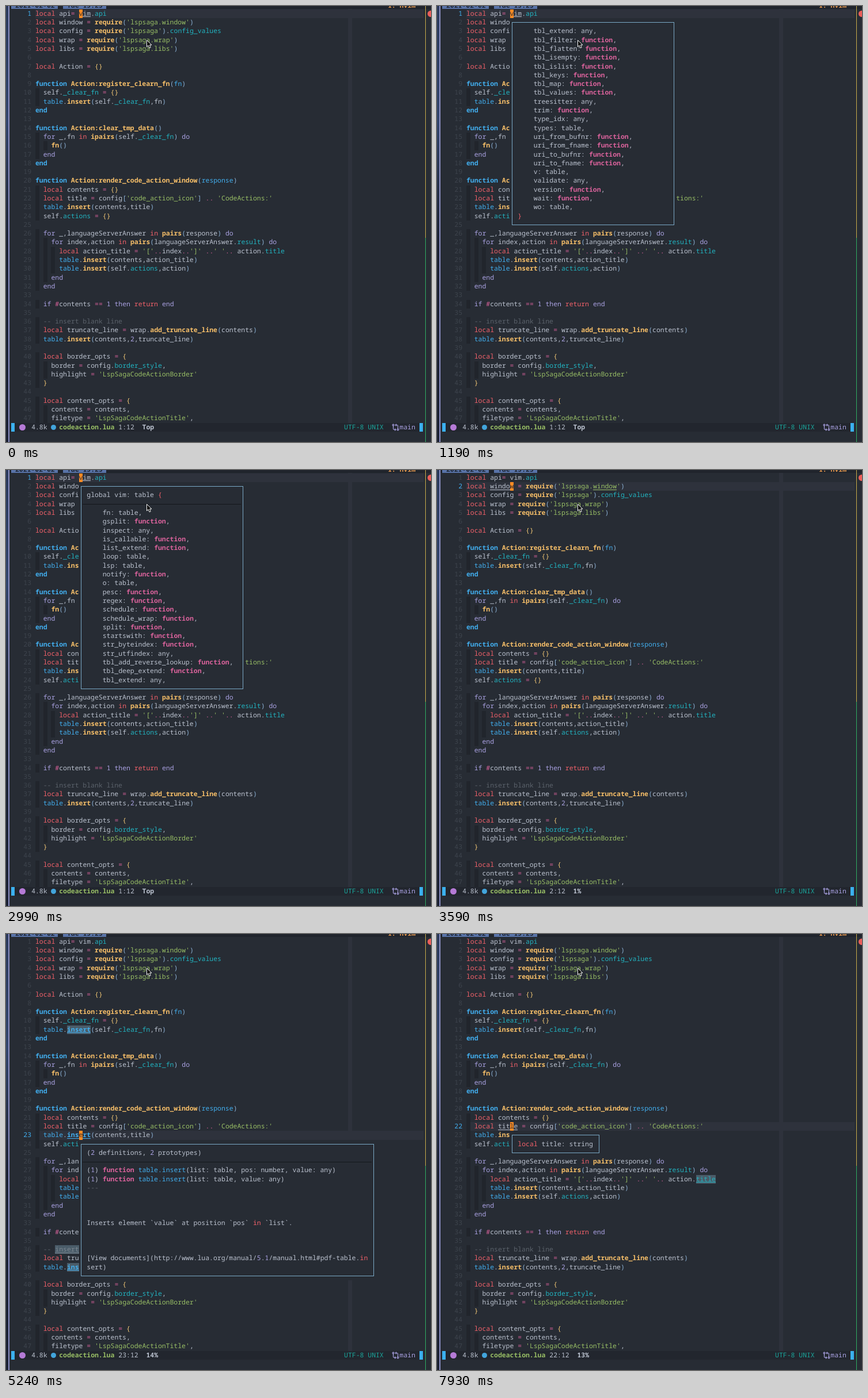
Write an HTML page that moves like this. It is 738 px wide and 758 px high and loops after 8 s.

```html
<!DOCTYPE html>
<html lang="en">
<head>
<meta charset="utf-8">
<title>Editor hover documentation</title>
<style>
:root { --bg: #272c34; --line: #2e323c; --fg: #bbc2cf; --blue: #42aeee; --w: 6.873px; --h: 15.293px; }
html, body { margin: 0; width: 738px; height: 758px; overflow: hidden; background: var(--bg); }
#stage { position: relative; width: 738px; height: 758px; overflow: hidden; color: var(--fg);
  font: 11.455px/var(--h) "Noto Sans Mono", monospace; text-rendering: geometricPrecision;
  font-variant-ligatures: none; }
#stage div, #stage svg { position: absolute; white-space: pre; }
#code, #marks, #pops, #status { left: 0; top: 0; }
.row { left: 0; height: var(--h); }
.row > div { top: 0; }
.c { color: #5b626b; }
.s { color: #98be65; }
.d { color: var(--blue); font-weight: bold; }
.f { color: #f7bf69; font-weight: bold; }
.k { color: #f2616a; }
.p { color: #a9a1e1; }
.t { color: #22b3c0; }
.b { color: var(--blue); }
.o { color: #d9629b; }
.y { color: #f0c674; }
.r { color: #8bb0d4; }
.m { color: #d9629b; font-weight: bold; }
.num { color: #3e444d; text-align: right; left: 16px; width: 28.1px; }
.num.on { color: var(--blue); }
.guide { width: var(--w); height: 15.5px; background: #21252c; }
#band { left: 51px; width: 674px; height: var(--h); background: var(--line); }
.hl { height: var(--h); background: #4a5c69; }
.hl.here { background: var(--line); }
.hl.f { color: var(--blue); }
.hl.c { color: #7d8791; }
.hl::after { content: ""; position: absolute; left: 0; right: 0; top: 12.6px; height: 1px; background: currentColor; }
#caret { width: 6.9px; height: var(--h); background: #fb8b24; color: #33302e; }
.pop { background: var(--bg); overflow: hidden; }
.frame { border: 1px solid #7aa9c6; box-sizing: border-box; }
.view { overflow: hidden; }
.rule { left: 0; height: 1px; background: #14171b; }
.bar { background: #3bb0ee; width: 5.5px; top: 725px; height: 15px; }
.tab { top: 0; height: 5px; background: #5873a8; }
.cap { top: -8px; color: #1c2431; font-weight: bold; }
</style>
</head>
<body>
<div id="stage">
  <div style="left:594px;top:5px;width:7px;height:720px;background:#2e323c"></div>
  <div id="band"></div>
  <div id="code"></div>
  <div id="marks"></div>
  <div id="caret"></div>
  <div id="pops"></div>
  <div style="left:9px;top:725px;width:716px;height:15px;background:#22262e"></div>
  <div class="bar" style="left:9px"></div>
  <div class="bar" style="left:718px"></div>
  <div style="left:23px;top:727px;width:11px;height:11px;border-radius:50%;background:#b57ad6"></div>
  <div style="left:78px;top:728px;width:9px;height:9px;border-radius:50%;background:#42a5dc"></div>
  <div id="status"></div>
  <svg style="left:670px;top:726px" width="13" height="13" fill="none" stroke="#a9a1e1" stroke-width="1.2">
    <circle cx="2.5" cy="2.5" r="1.4"/><circle cx="10.5" cy="10.5" r="1.4"/>
    <path d="M2.5 4V9Q2.5 10.5 4 10.5H6.5M5 8.7L6.8 10.5L5 12.3M10.5 9V4Q10.5 2.5 9 2.5H6.5M8 .7L6.2 2.5L8 4.3"/>
  </svg>
  <div style="left:0;top:0;width:738px;height:5px;background:#20242c"></div>
  <div class="tab" style="left:9px;width:81px"></div>
  <div class="tab" style="left:99px;width:75px"></div>
  <div style="left:0;top:0;width:738px;height:6px;overflow:hidden">
    <div class="cap" style="left:16px">2021-02-02</div>
    <div class="cap" style="left:106px">Tue 15:25</div>
    <div class="cap" style="left:663px;color:#e0954d">1: nvim</div>
  </div>
  <div style="left:0;top:0;width:4px;height:758px;background:linear-gradient(#2b3a5c,#33466e 200px,#263049 320px,#1c2233 420px)"></div>
  <div style="left:4px;top:0;width:2px;height:758px;background:#8d90c4"></div>
  <div style="left:728px;top:0;width:1.3px;height:758px;background:linear-gradient(#c9ad4b 403px,#2fae62 403px)"></div>
  <div style="left:732px;top:8px;width:11px;height:11px;border-radius:50%;background:#ec5f5b"></div>
  <svg style="left:243px;top:58px" width="14" height="18">
    <path d="M1.5 1.5V13L4.2 10.5L6 15L8.2 14L6.4 9.8H10Z" fill="#000" stroke="#fff"/>
  </svg>
</div>
<script>
const X0 = 51, Y0 = 5.85, W = 6.873, H = 15.293, LOOP = 8000, COL = 11, TOTAL = 164;

const CODE = `local api= vim.api
local window = require('lspsaga.window')
local config = require('lspsaga').config_values
local wrap = require('lspsaga.wrap')
local libs = require('lspsaga.libs')

local Action = {}

function Action:register_clearn_fn(fn)
  self._clear_fn = {}
  table.insert(self._clear_fn,fn)
end

function Action:clear_tmp_data()
  for _,fn in ipairs(self._clear_fn) do
    fn()
  end
end

function Action:render_code_action_window(response)
  local contents = {}
  local title = config['code_action_icon'] .. 'CodeActions:'
  table.insert(contents,title)
  self.actions = {}

  for _,languageServerAnswer in pairs(response) do
    for index,action in pairs(languageServerAnswer.result) do
      local action_title = '['..index..']' ..' '.. action.title
      table.insert(contents,action_title)
      table.insert(self.actions,action)
    end
  end

  if #contents == 1 then return end

  -- insert blank line
  local truncate_line = wrap.add_truncate_line(contents)
  table.insert(contents,2,truncate_line)

  local border_opts = {
    border = config.border_style,
    highlight = 'LspSagaCodeActionBorder'
  }

  local content_opts = {
    contents = contents,
    filetype = 'LspSagaCodeActionTitle',`.split('\n');

const LUA = [
  [/--.*/, 'c'], [/'[^']*'/, 's'], [/^function|^end/, 'd'], [/Action:\w+/, 'f'],
  [/\b(?:local|in|return)\b/, 'k'], [/\b(?:for|do|end|if|then|\d+)\b/, 'p'],
  [/\w+(?=\()/, 'f'], [/(?<=[\w)]\.)\w+/, 't'], [/table(?=\.)/, 'b'], [/(?<=^function.*\()\w+/, 'b'],
  [/=+|\.\.|#/, 'o'], [/[{}]/, 'y'], [/[()[\]]/, 'r']
];
const DOC = [
  [/---/, 'c'], [/\bfunction\b/, 'm'], [/table\.insert/, 'b'], [/\b(?:local|in)\b/, 'k'],
  [/\b\d+\b/, 'p'], [/[{}]/, 'k']
];

// A leading * marks a function, ? an untyped field, no mark a table.
const FIELDS = ('fn *gsplit ?inspect *is_callable *list_extend loop lsp *notify o *pesc *regex *schedule ' +
  '*schedule_wrap *split *startswith *str_byteindex ?str_utfindex *tbl_add_reverse_lookup *tbl_deep_extend ' +
  '?tbl_extend *tbl_filter *tbl_flatten *tbl_isempty *tbl_islist *tbl_keys *tbl_map *tbl_values ?treesitter ' +
  '*trim ?type_idx types *uri_from_bufnr *uri_from_fname *uri_to_bufnr *uri_to_fname v ?validate *version ' +
  '*wait wo').split(' ').map(f => {
    const type = { '*': 'function', '?': 'any' }[f[0]] || 'table';
    return `    ${f.replace(/^\W/, '')}: ${type},`;
  });

const RULE = '\u2500';
const POPS = {
  list: { top: 2, bottom: 25, right: 52, text: ['global vim: table {', RULE, ...FIELDS, '}'] },
  doc: { top: 24, bottom: 39, right: 85, text: [
    '(2 definitions, 2 prototypes)', RULE,
    '(1) function table.insert(list: table, pos: number, value: any)',
    '(1) function table.insert(list: table, value: any)', '---', '', '', '',
    'Inserts element `value` at position `pos` in `list`.', '', '', '',
    '[View documents](http://www.lua.org/manual/5.1/manual.html#pdf-table.in', 'sert)'] },
  type: { top: 23, bottom: 25, right: 33, text: ['local title: string'] }
};

// time, cursor line, marked word, popup, popup scroll
const SCENES = [
  [0, 1, 'vim'], [300, 1, '', 'list', 0], [450, 1, 'vim', 'list', 0], [890, 1, 'vim', 'list', 20],
  [1190, 1, 'vim', 'list', 21], [2540, 1, 'vim', 'list', 18], [2840, 1, 'vim', 'list', 1],
  [2990, 1, 'vim', 'list', 0], [3590, 2, 'window'], [3740, 4, ''], [3890, 9, ''], [4040, 17, ''],
  [4190, 22, 'title'], [4640, 23, 'insert'], [5090, 23, '', 'doc', 0], [5240, 23, 'insert', 'doc', 0],
  [6130, 22, 'title'], [6580, 23, ''], [6730, 23, 'insert'], [7480, 22, 'title'], [7930, 22, 'title', 'type', 0]
];

const $ = id => document.getElementById(id);
const colX = c => X0 + c * W;
const rowY = n => Y0 + (n - 1) * H;

function add(parent, cls, box, text = '') {
  const el = document.createElement('div');
  el.className = cls;
  for (const k in box) el.style[k] = box[k] + 'px';
  el.textContent = text;
  return parent.appendChild(el);
}

function tokens(text, rules) {
  const re = new RegExp(rules.map(r => `(${r[0].source})`).join('|'), 'g');
  const out = [];
  let last = 0;
  const push = (col, s, cls) => s.trim() && out.push({ col, s, cls });
  for (const m of text.matchAll(re)) {
    push(last, text.slice(last, m.index), '');
    push(m.index, m[0], rules[m.slice(1).findIndex(g => g !== undefined)][1]);
    last = m.index + m[0].length;
  }
  push(last, text.slice(last), '');
  return out;
}

function addRow(parent, left, top, toks) {
  const row = add(parent, 'row', { left, top });
  for (const t of toks) add(row, t.cls, { left: t.col * W }, t.s);
}

const lines = CODE.map(text => tokens(text, LUA));
const nums = lines.map((toks, i) => {
  const top = rowY(i + 1), indent = CODE[i].search(/\S/);
  for (let c = 0; c < indent; c += 2) add($('code'), 'guide', { left: colX(c), top });
  addRow($('code'), X0, top, toks);
  return add($('code'), 'num', { top }, i + 1);
});

for (const p of Object.values(POPS)) {
  const width = (p.right - COL) * W, height = (p.bottom - p.top) * H;
  p.el = add($('pops'), 'pop', { left: colX(COL), top: rowY(p.top), width: width + W, height: height + H });
  add(p.el, 'frame', { left: W / 2 - .5, top: H / 2 - .5, width: width + 1, height: height + 1 });
  const view = add(p.el, 'view', { left: W, top: H, width: width - W, height: height - H });
  p.body = add(view, '', { left: 0, top: 0 });
  p.text.forEach((s, i) => {
    if (s === RULE) add(p.body, 'rule', { top: (i + .5) * H, width: width - W });
    else addRow(p.body, W, i * H, tokens(s, DOC));
  });
}

function mark(word, line) {
  $('marks').replaceChildren();
  if (!word) return;
  CODE.forEach((text, i) => {
    for (const m of text.matchAll(new RegExp(`\\b${word}\\b`, 'g'))) {
      const { cls } = lines[i].findLast(t => t.col <= m.index);
      const here = i + 1 === line ? ' here' : '';
      add($('marks'), `hl ${cls}${here}`, { left: colX(m.index), top: rowY(i + 1), width: word.length * W }, word);
    }
  });
}

function status(line) {
  const box = $('status'), top = rowY(48), pos = line + ':' + (COL + 1);
  const put = (col, s, cls) => add(box, cls, { left: colX(col), top }, s);
  box.replaceChildren();
  put(-1, '4.8k', '');
  put(6, 'codeaction.lua', 's').style.fontWeight = 'bold';
  put(21, pos, '');
  put(23 + pos.length, line === 1 ? 'Top' : Math.floor(line / TOTAL * 100) + '%', '').style.fontWeight = 'bold';
  put(78, 'UTF-8 UNIX', '').style.color = '#1ba69c';
  put(92, 'main', 'p');
}

function show([, line, word, pop, scroll]) {
  const top = rowY(line) + 'px', caret = $('caret');
  $('band').style.top = caret.style.top = top;
  caret.style.left = colX(COL) + 'px';
  caret.textContent = CODE[line - 1][COL] || '';
  nums.forEach((n, i) => n.classList.toggle('on', i + 1 === line));
  mark(word, line);
  status(line);
  for (const key in POPS) POPS[key].el.style.display = key === pop ? '' : 'none';
  if (pop) POPS[pop].body.style.top = -scroll * H + 'px';
}

let shown;
function tick() {
  const t = performance.now() % LOOP;
  const scene = SCENES.findLast(s => s[0] <= t);
  if (scene !== shown) show(shown = scene);
  requestAnimationFrame(tick);
}
tick();
</script>
</body>
</html>
```
